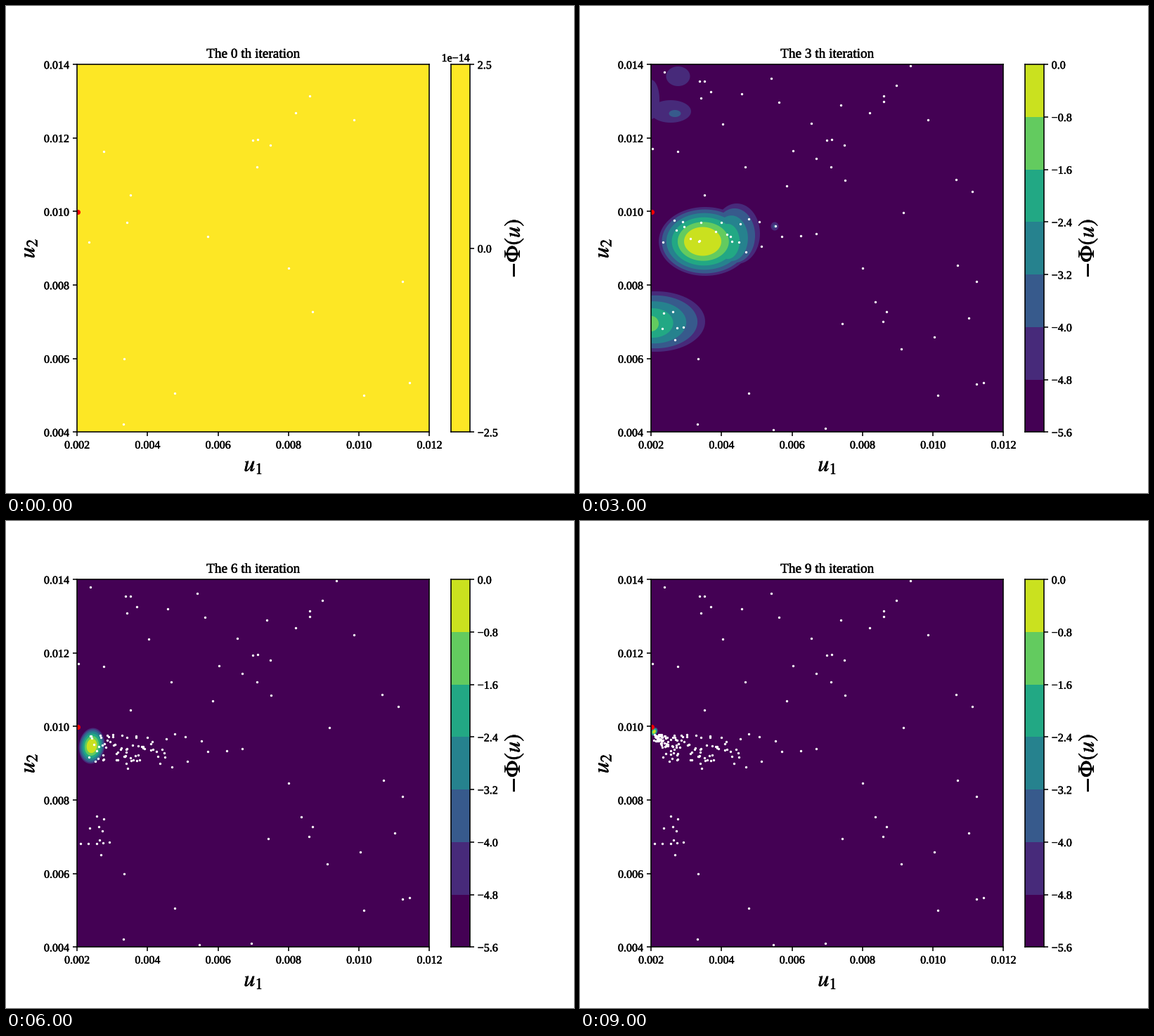
These frames come from a looping animation (808x693 px, 10000 ms). A matplotlib script:

```python
import numpy as np
import matplotlib.pyplot as plt
from matplotlib.animation import FuncAnimation
from matplotlib.patheffects import withStroke
from matplotlib.text import Text

W, H, DPI = 808, 693, 115.5
LEFT, RIGHT, TOP, BOTTOM = 101, 602.4, 83.2, 606.4
BAR_LEFT, BAR_RIGHT = 633, 659.5

plt.rcParams.update({
    "font.family": "Liberation Serif",
    "mathtext.fontset": "stix",
    "font.size": 10,
    "axes.linewidth": 1,
    "xtick.major.width": 1,
    "ytick.major.width": 1,
})

# Colour bands: seven steps of 0.8 from -5.6 to 0, scaled to [-5, 0]
cmap = plt.get_cmap("viridis")
BANDS = [cmap(float(np.clip((-0.2 + 0.8 * k) / 5, 0, 1))) for k in range(7)]
FLAT = cmap(1.0)

rng = np.random.default_rng(11)

# Where the first fit has narrow bumps, in stage pixels
BUMPS = [(230, 125.5), (103, 203.5), (235, 229), (277.5, 313.5),
         (236, 350.5), (469.5, 85.5), (431.5, 136), (376.5, 248),
         (460, 294), (558, 264.5), (431, 449.5), (563.5, 538), (349, 601.5)]


def late_peak(k):
    """Centre and radii of the single peak closing in on the optimum."""
    n = k - 5
    q = 0.63 ** n
    rx = 29 * q
    return 100 + 35 * q, 323 - 2 * n - 0.95 * n * n, rx, min(1.4 * rx, 44)


def scatter(n, cx, cy, sx, sy):
    x = cx + rng.uniform(-sx, sx, n)
    y = cy + rng.uniform(-sy, sy, n)
    return list(zip(np.maximum(x, LEFT + 2), y))


def anywhere(n):
    return scatter(n, (LEFT + RIGHT) / 2, (TOP + BOTTOM) / 2, 248, 260)


def near_peak(k):
    x, y, rx, ry = late_peak(k)
    return scatter(20, x + 0.25 * rx, y, 0.8 * rx, 0.5 * ry)


BATCHES = [
    anywhere(20),
    BUMPS + anywhere(7),
    scatter(13, 430, 330, 155, 200) + scatter(5, 215, 330, 45, 25)
    + scatter(2, 130, 456, 25, 6),
    scatter(4, 160, 125, 30, 25) + scatter(12, 185, 328, 55, 27)
    + scatter(4, 145, 455, 35, 24),
    scatter(6, 122, 443, 18, 26) + scatter(14, 195, 333, 52, 20),
] + [near_peak(k) for k in range(4, 9)]

# Each hill: bands from the rim inwards, tilt, rim oval, top oval
ALL = (1, 2, 3, 4, 5, 6)
HILLS = {
    2: [((1, 2, 3, 4, 4, 3), 0, (139, 125, 66, 52), (139, 125, 18, 15)),
        (ALL, 0, (186, 336, 69, 51), (185.5, 336, 31.5, 21)),
        ((1, 2, 3, 4), -17, (256, 298, 38, 67), (220, 332, 26, 31)),
        (ALL, 0, (120, 454, 71, 49), (118.5, 454.5, 10.5, 7))],
    3: [((1,), 0, (139.5, 100, 17, 14), (139.5, 100, 17, 14)),
        ((1,), 0, (101, 133, 12, 28), (101, 133, 12, 28)),
        ((1, 2), 0, (129, 150, 29, 16), (135, 153, 8.5, 5)),
        (ALL, 0, (178, 335, 66, 49), (174.5, 335, 26.5, 20.5)),
        ((1, 2, 3, 4), 0, (223, 324, 33, 43), (210, 335, 17, 25)),
        ((1, 2), 0, (277, 313.5, 5.5, 6), (277, 313.5, 2.5, 2.5)),
        ((1, 2, 3, 4, 5), 0, (108, 449, 70, 43), (101, 452, 11, 11))],
}
for k in range(4, 10):
    x, y, rx, ry = late_peak(k)
    HILLS[k] = [(ALL, min(0, 8 * (5 - k)), (x, y, rx, ry),
                 (x, y, 0.4 * rx, 0.4 * ry))]

fig = plt.figure(figsize=(W / DPI + 1e-9, H / DPI + 1e-9), dpi=DPI)


def pixel_axes(x0, x1):
    return fig.add_axes([x0 / W, 1 - BOTTOM / H,
                         (x1 - x0) / W, (BOTTOM - TOP) / H])


ax = pixel_axes(LEFT, RIGHT)
cax = pixel_axes(BAR_LEFT, BAR_RIGHT)


def oval(band, cx, cy, rx, ry, tilt=0):
    t = np.linspace(0, 2 * np.pi, 90)
    x, y = rx * np.cos(t), ry * np.sin(t)
    a = np.radians(tilt)
    ax.fill(cx + x * np.cos(a) + y * np.sin(a),
            cy - x * np.sin(a) + y * np.cos(a),
            color=BANDS[band], lw=0, zorder=1)


def draw_hills(hills):
    # Step by step across all hills, so that touching bands merge
    for step in range(6):
        for bands, tilt, rim, top in hills:
            if step < len(bands):
                f = (step / max(len(bands) - 1, 1)) ** 1.3
                shape = (1 - f) * np.array(rim) + f * np.array(top)
                oval(bands[step], *shape, tilt)


def draw_bumps():
    for x, y in BUMPS:
        height = min(0.0125 * (320 - x), 1.8)
        for k in range(4):
            edge = 0.4 + 0.8 * k
            if abs(height) > edge:
                r = 6 * np.sqrt(2 * np.log(abs(height) / edge))
                oval(5 + k if height > 0 else 3 - k, x, y, r, 1.2 * r)


def colorbar(i):
    cax.clear()
    cax.set(xlim=(0, 1), xticks=[])
    if i == 0:
        cax.set_facecolor(FLAT)
        cax.set_ylim(-2.5, 2.5)
        marks = [-2.5, 0, 2.5]
        cax.text(1, 1.008, "1e\u221214", transform=cax.transAxes,
                 ha="right", va="baseline")
    else:
        cax.set_ylim(-5.6, 0)
        marks = [-0.8 * k for k in range(7, -1, -1)]
        for low, color in zip(marks, BANDS):
            cax.axhspan(low, low + 0.8, color=color, lw=0)
    labels = [f"{m or 0:.1f}".replace("-0.0", "0.0").replace("-", "\u2212")
              for m in marks]
    cax.set_yticks(marks, labels)
    cax.yaxis.tick_right()
    cax.yaxis.set_label_position("right")
    cax.set_ylabel(r"$-\Phi(u)$", fontsize=20)


def draw(i):
    ax.clear()
    ax.set_facecolor(FLAT if i == 0 else BANDS[4 if i == 1 else 0])
    ax.set_xticks(np.linspace(LEFT, RIGHT, 6),
                  [f"{0.002 * k:.3f}" for k in range(1, 7)])
    ax.set_yticks(np.linspace(BOTTOM, TOP, 6),
                  [f"{0.002 * k:.3f}" for k in range(2, 8)])
    ax.set_xlabel("$u_1$", fontsize=20)
    ax.set_ylabel("$u_2$", fontsize=20)
    ax.set_title(f"The {i} th iteration", fontsize=12)
    if i == 1:
        draw_bumps()
    draw_hills(HILLS.get(i, []))
    dots = np.array(sum(BATCHES[:i + 1], []))
    ax.plot(dots[:, 0], dots[:, 1], "o", color="white", ms=2.1, mew=0)
    ax.plot(101.5, 293, "o", color="red", ms=4.4, mew=0, zorder=2.2)
    ax.set(xlim=(LEFT, RIGHT), ylim=(BOTTOM, TOP))
    colorbar(i)
    # A hairline makes the lettering a little heavier
    for text in fig.findobj(Text):
        text.set_path_effects([withStroke(linewidth=0.3, foreground="black")])
    return []


anim = FuncAnimation(fig, draw, frames=10, interval=1000, repeat=True,
                     repeat_delay=0, blit=False)
plt.show()
```
